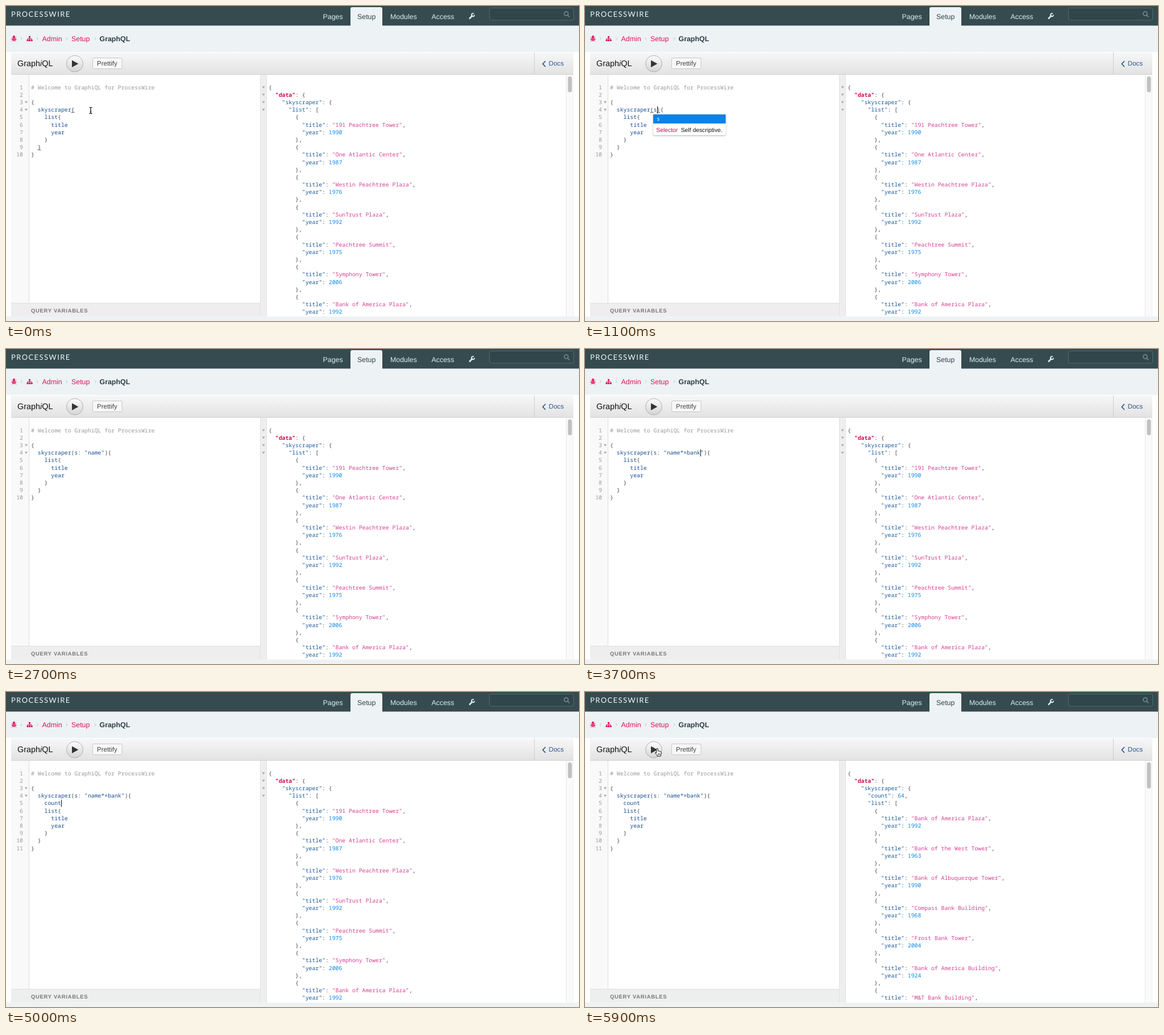
Animation, 1008 px wide and 555 px high, one loop 8000 ms. Source, as an HTML page:

```html
<!DOCTYPE html>
<html lang="en">
<head>
<meta charset="utf-8">
<title>GraphiQL</title>
<style>
html, body { margin: 0; width: 100%; height: 100%; overflow: hidden; background: #fff; }
svg { display: block; width: 1008px; height: 555px; }
text { font-family: "Liberation Sans", Arial, sans-serif; font-size: 12.4px; white-space: pre; text-rendering: geometricPrecision; }
.code text { font-family: "Noto Sans Mono", "DejaVu Sans Mono", monospace; font-size: 9.8px; fill: #4a4a4a; }
.code .num { fill: #999; text-anchor: end; }
.com { fill: #999; }
.prop { fill: #1a4f91; }
.key { fill: #1a5a9e; }
.def { fill: #d2054e; font-weight: bold; }
.str { fill: #d64292; }
.int { fill: #0e86e8; }
.nav text { fill: #d9eef6; }
.crumb text { fill: #e0145a; }
.fold { fill: #aaa; }
</style>
</head>
<body>
<svg viewBox="0 0 1008 555">
  <defs>
    <linearGradient id="bar" x2="0" y2="1"><stop stop-color="#f7f7f7"/><stop offset="1" stop-color="#e2e2e2"/></linearGradient>
    <linearGradient id="knob" x2="0" y2="1"><stop stop-color="#fdfdfd"/><stop offset="1" stop-color="#d2d3d6"/></linearGradient>
    <clipPath id="pane"><rect x="9" y="121" width="989" height="426"/></clipPath>
    <filter id="shadow" x="-10%" y="-20%" width="120%" height="160%"><feDropShadow dx="0" dy="1" stdDeviation="1.3" flood-opacity=".4"/></filter>
  </defs>

  <rect width="1008" height="81" fill="#edf2f5"/>
  <rect width="1008" height="34.5" fill="#354b50"/>
  <text x="9" y="19" fill="#f2f8fa" style="font: 13px Lato, sans-serif; letter-spacing: 1.4px">PROCESSWIRE</text>
  <path d="M606 35V5q0-3 3-3h50q3 0 3 3v30z" fill="#edf2f5"/>
  <g class="nav">
    <text x="557.5" y="22.7">Pages</text>
    <text x="618" y="22.7" style="fill:#2f4448">Setup</text>
    <text x="676" y="22.7">Modules</text>
    <text x="748.5" y="22.7">Access</text>
  </g>
  <g fill="none" stroke="#d9eef6" stroke-linecap="round">
    <path d="M815.8 21.8L820 17.4" stroke-width="2.7"/>
    <path d="M822.4 13.3A2.6 2.6 0 1 0 824 16.5" stroke-width="1.9"/>
  </g>
  <rect x="850.5" y="3.5" width="148" height="21.5" rx="3" fill="#30464b" stroke="#536a70"/>
  <g fill="none" stroke="#6d909c" stroke-width="1.6"><circle cx="985.5" cy="13.5" r="3.5"/><path d="M988 16.2l3.4 3.3"/></g>

  <g class="crumb">
    <g fill="#e0145a" stroke="#e0145a">
      <ellipse cx="14" cy="58.5" rx="2.6" ry="3.6" stroke="none"/><circle cx="14" cy="54" r="2" stroke="none"/>
      <path d="M10 54.5l2 2M18 54.5l-2 2M9 58.5h10M10 62.3l2-2M18 62.3l-2-2" fill="none"/>
      <path d="M14 56v6" stroke="#edf2f5" stroke-width=".7"/>
      <path d="M40 53h3v3h-3zM36.5 59h3v3h-3zM40 59h3v3h-3zM43.7 59h3v3h-3z" stroke="none"/>
      <path d="M41.5 55v4M38 59.5v-2h7v2" fill="none"/>
    </g>
    <path d="M26 55l2 2.5-2 2.5M54 55l2 2.5-2 2.5M106 55l2 2.5-2 2.5M156 55l2 2.5-2 2.5" fill="none" stroke="#bcc4c8"/>
    <text x="63.5" y="61.7">Admin</text>
    <text x="115" y="61.7">Setup</text>
    <text x="164.5" y="61.7" style="fill:#2c3e43;font-weight:bold">GraphQL</text>
  </g>

  <rect x="9" y="82" width="989" height="39" fill="url(#bar)"/>
  <path d="M9 120.5H998" stroke="#d0d0d0"/>
  <text x="20" y="106" fill="#111" style="font-size:14.4px">Graph<tspan font-style="italic">i</tspan>QL</text>
  <circle cx="121" cy="101.7" r="14.4" fill="url(#knob)" stroke="#aeaeae"/>
  <path d="M116 95.5v12.4l11.3-6.2z" fill="#333"/>
  <rect x="152.5" y="91.5" width="51.5" height="19" rx="2" fill="#f8f8f8" stroke="#c6c6c6"/>
  <text x="160" y="104.6" fill="#444" style="font-size:11.5px">Prettify</text>
  <path d="M929.5 82V120" stroke="#ccc"/>
  <path d="M949 97l-4.7 5 4.7 5" fill="none" stroke="#2a568f" stroke-width="1.7"/>
  <text x="954.8" y="105.4" fill="#2a568f" style="font-size:11.6px">Docs</text>

  <rect x="9" y="121" width="31" height="402" fill="#f9f9f9"/>
  <path d="M40.5 121V523" stroke="#ddd"/>
  <rect x="447" y="121" width="11.5" height="426" fill="#eee"/>
  <path d="M447.5 121V547M458.5 121V547M997.5 121V547" stroke="#e2e2e2"/>
  <rect x="985" y="121" width="12.5" height="426" fill="#fafafa"/>
  <path d="M985.5 121V547" stroke="#e6e6e6"/>
  <rect id="thumb" x="988.5" y="124" width="7" rx="3.5" fill="#c1c1c1"/>

  <g class="code" clip-path="url(#pane)"><g id="query"></g><g id="result"></g></g>

  <rect x="9" y="523" width="438" height="24" fill="#eee"/>
  <path d="M9 523.5H447" stroke="#e0e0e0"/>
  <text x="44" y="539.6" fill="#777" style="font-size:9.4px;font-weight:bold;letter-spacing:.75px">QUERY VARIABLES</text>
  <rect y="547" width="1008" height="8" fill="#eef2f5"/>

  <g id="hint">
    <rect x="120" y="190.5" width="127.5" height="37" rx="2" fill="#fff" filter="url(#shadow)"/>
    <rect x="120" y="191" width="127.5" height="16" fill="#0a82e6"/>
    <g class="code"><text x="126" y="202" style="fill:#fff">s</text></g>
    <text x="125.3" y="221.6" fill="#d2054e" style="font-size:10.35px">Selector</text>
    <text x="168.7" y="221.6" fill="#111" style="font-size:10.35px">Self descriptive.</text>
  </g>
  <rect id="caret" width="1" height="12.5" fill="#111"/>
  <g id="mouse">
    <g><path d="M-2.7-5.5Q0-5.5 0-3.5Q0-5.5 2.7-5.5M0-3.5V3.5M-2.7 5.5Q0 5.5 0 3.5Q0 5.5 2.7 5.5M-1.3 1.5H1.3" fill="none" stroke="#111" stroke-width="1.2"/></g>
    <g><path d="M0 0V12L2.8 9.4 4.8 13.6 6.6 12.7 4.7 8.6H8.4Z" fill="#111" stroke="#fff" stroke-width=".8"/></g>
    <g><path d="M-1.3 1.2Q-1.3 0 0 0T1.3 1.2V4.6Q2.3 3.8 3.2 4.8Q4.4 4.2 5.2 5.4Q7.2 5 7.2 7V9L6.2 11.5V13.5H0V12L-3.2 8.6Q-4.2 7-2.7 6.7L-1.3 8Z" fill="#fff" stroke="#111"/><path d="M1.5 8.5v3M3.2 8.5v3M4.9 8.5v3" stroke="#111" stroke-width=".7"/></g>
  </g>
</svg>
<script>
const LOOP = 8000, CH = 5.88, ROW = 13.19, LEFT = 44, RIGHT = 462;
const $ = id => document.getElementById(id);
const base = row => 146.6 + (row - 1) * ROW;
const span = (cls, s) => `<tspan class="${cls}">${s}</tspan>`;
const line = (x, row, s) => `<text x="${x}" y="${base(row)}">${s}</text>`;
const fold = (x, row) => `<path class="fold" d="M${x - 2.5} ${base(row) - 5.2}h5l-2.5 4z"/>`;
const show = (el, on) => { el.style.display = on ? '' : 'none'; };

const paintQuery = s => s[0] === '#' ? span('com', s)
  : s.replace(/"[^"]*"|\w+:?/g, m => span('prop', m));
const paintJson = s => s.replace('&', '&amp;')
  .replace(/("[^"]*")(:?)|\b\d+\b/g, (m, str, colon) =>
    !str ? span('int', m)
    : colon ? span(str === '"data"' ? 'def' : 'key', str) + colon
    : span('str', str));

function resultText(items, count) {
  const rows = ['{', '  "data": {', '    "skyscraper": {'];
  if (count) rows.push(`      "count": ${count},`);
  rows.push('      "list": [');
  for (const [title, year] of items)
    rows.push('        {', `          "title": "${title}",`, `          "year": ${year}`, '        },');
  return rows.slice(0, 32).map((s, i) => line(RIGHT, i + 1, paintJson(s))).join('');
}

const before = resultText([
  ['191 Peachtree Tower', 1990], ['One Atlantic Center', 1987], ['Westin Peachtree Plaza', 1976],
  ['SunTrust Plaza', 1992], ['Peachtree Summit', 1975], ['Symphony Tower', 2006], ['Bank of America Plaza', 1992]
]) + [1, 2, 3, 4].map(r => fold(453, r)).join('');
const after = resultText([
  ['Bank of America Plaza', 1992], ['Bank of the West Tower', 1963], ['Bank of Albuquerque Tower', 1990],
  ['Compass Bank Building', 1968], ['Frost Bank Tower', 2004], ['Bank of America Building', 1924], ['M&T Bank Building', 1967]
], 64);

// Key press times
const ARGS = '(s: "name*=bank', FIELD = 'count';
const argKeys = [700, 1000, 1300, 1400, 1600, 1800, 1900, 2000, 2100, 2900, 3100, 3300, 3400, 3500, 3600];
const fieldKeys = [4600, 4700, 4800, 4900, 5000];
const END = 4000, ENTER = 4300, MOVE = 5200, DONE = 5900;
const allKeys = [-600, ...argKeys, END, ENTER, ...fieldKeys];
const pressed = (keys, t) => keys.filter(k => k <= t).length;

function drawQuery(t) {
  const n = pressed(argKeys, t);
  const args = ARGS.slice(0, n);
  const head = `  skyscraper${args}${n > 4 ? '")' : n ? ')' : ''}{`;
  const field = FIELD.slice(0, pressed(fieldKeys, t));
  const rows = ['# Welcome to GraphiQL for ProcessWire', '', '{', head,
    ...(t >= ENTER ? ['    ' + field] : []),
    '    list{', '      title', '      year', '    }', '  }', '}'];

  let marks = [];
  if (t < argKeys[0] || (t >= END && t < ENTER)) marks = [[4, head.length - 1], [9, 2]];
  else if (n < 5) marks = [[4, 12], [4, 12 + n]];

  $('query').innerHTML = rows.map((s, i) =>
    `<text class="num" x="30" y="${base(i + 1)}">${i + 1}</text>` + line(LEFT, i + 1, paintQuery(s))).join('')
    + fold(35.5, 3) + fold(35.5, 4)
    + marks.map(([r, c]) => `<rect x="${LEFT + c * CH}" y="${base(r) + 1}" width="5.9" height=".9" fill="#555"/>`).join('');

  const entered = t >= ENTER;
  const col = entered ? 4 + field.length : t >= END ? head.length : 12 + n;
  const idle = t - allKeys[pressed(allKeys, t) - 1];
  show($('caret'), t < 5600 && idle % 1060 < 530);
  $('caret').setAttribute('x', Math.round(LEFT + col * CH + .4));
  $('caret').setAttribute('y', base(entered ? 5 : 4) - 9.4);
  show($('hint'), t >= 800 && t < argKeys[2]);
}

function drawMouse(t) {
  const p = Math.min(1, Math.max(0, (t - MOVE) / 500));
  const e = p * p * (3 - 2 * p);
  const x = 149 - 22 * e, y = 184 - 84.5 * e;
  const kind = y > 121 ? 0 : Math.hypot(x - 121, y - 101.7) > 14.4 ? 1 : 2;
  show($('mouse'), t < argKeys[0] || t >= MOVE);
  $('mouse').setAttribute('transform', `translate(${x} ${y})`);
  [...$('mouse').children].forEach((el, i) => show(el, i === kind));
}

let lastTick = -1, lastDone = null;
function frame(now) {
  const t = Math.floor((now % LOOP) / 100) * 100;
  if (t !== lastTick) {
    lastTick = t;
    drawQuery(t);
    drawMouse(t);
    const done = t >= DONE;
    if (done !== lastDone) {
      lastDone = done;
      $('result').innerHTML = done ? after : before;
      $('thumb').setAttribute('height', done ? 46 : 28);
    }
  }
  requestAnimationFrame(frame);
}
frame(performance.now());
</script>
</body>
</html>
```
